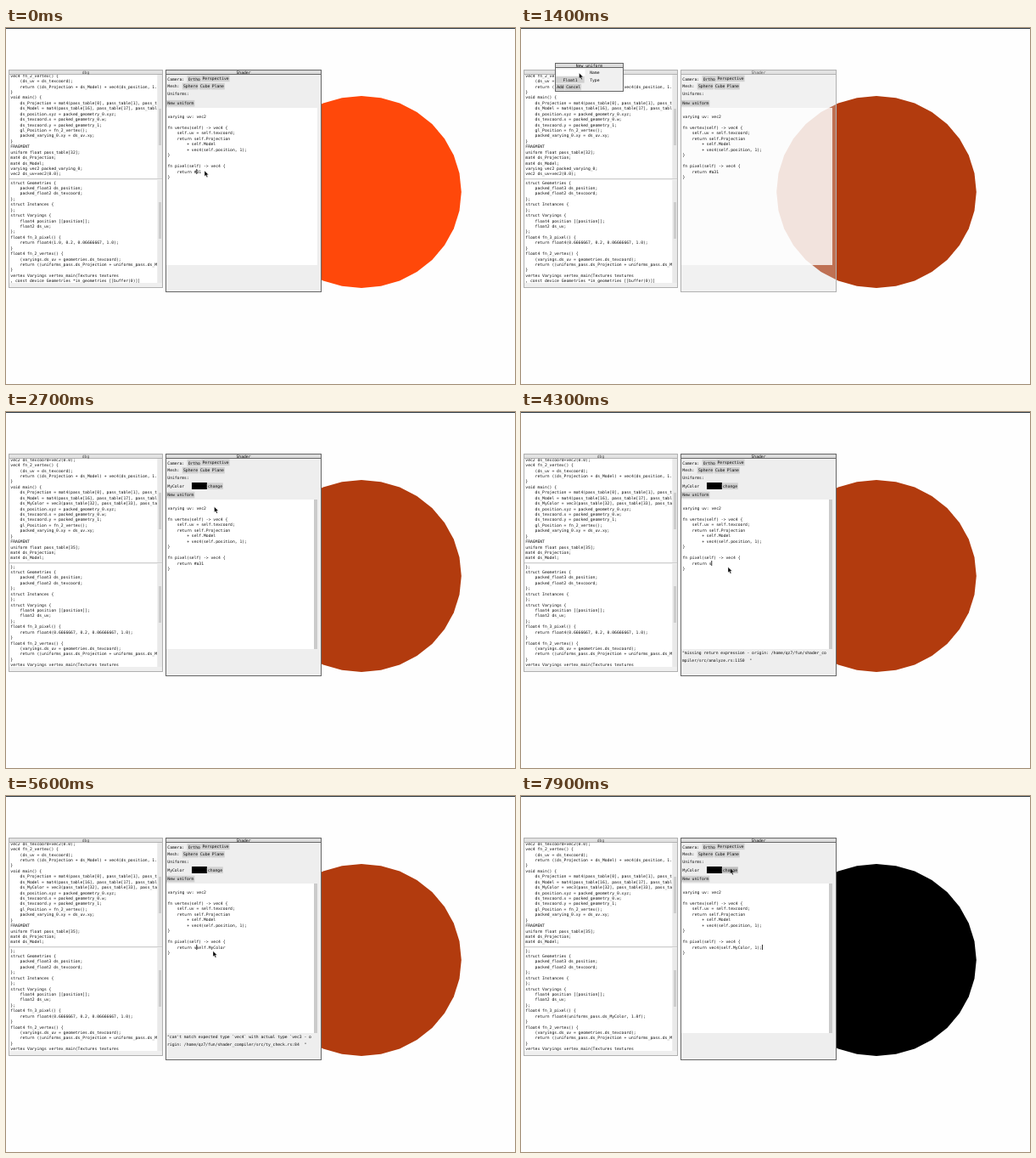
These frames come from a looping animation (600 by 419 pixels, 8000 ms). An HTML page:

```html
<!DOCTYPE html>
<html lang="en">
<head>
<meta charset="utf-8">
<title>Shader editor</title>
<style>
html, body { margin: 0; width: 100%; height: 100%; overflow: hidden; background: #fefefe; }
svg { display: block; width: 100vw; height: 100vh; }
text { font: 4.72px "DejaVu Sans Mono", monospace; fill: #0c0c0c; white-space: pre; text-rendering: geometricPrecision; }
.dim text { fill: #555; }
</style>
</head>
<body>
<svg id="stage" viewBox="0 0 600 419"></svg>
<script>
const stage = document.getElementById("stage");
const LOOP = 8000, TICK = 100, CHAR = 2.842, LINE = 6.43;

// Key moments of the session, in ms
const RECOLOR = 300, OPEN = 700, ADD = 2500, DONE = 7300;

// Faceted outline of the sphere
const SIDES = 32;
const BALL = Array.from({ length: SIDES }, (_, i) => {
  const a = i * 2 * Math.PI / SIDES;
  return (419 + 117.8 * Math.cos(a)).toFixed(1) + "," + (193 + 113 * Math.sin(a)).toFixed(1);
}).join(" ");

const MOUSE = [
  [0, 234, 168], [300, 234, 168], [700, 206, 88], [1000, 206, 88], [1400, 68.5, 53],
  [1800, 68.5, 53], [2000, 58, 60], [2300, 58, 60], [2400, 46, 69], [2500, 46, 69],
  [2700, 245.5, 111.5], [3100, 236, 178], [3600, 244, 182.5], [7400, 244, 182.5], [7800, 246.5, 85]
];

const escapeXml = s => s.replace(/&/g, "&amp;").replace(/</g, "&lt;").replace(/>/g, "&gt;");
const text = (x, y, s) => `<text x="${x}" y="${y + 1.7}">${escapeXml(s)}</text>`;
const centered = (x, y, s) => text(x - s.length * CHAR / 2, y, s);
const lines = (x, y, list, step = LINE) => list.map((s, i) => text(x, y + i * step, s)).join("");
const box = (x, y, w, h, fill, extra = "") =>
  `<rect x="${x}" y="${y}" width="${w}" height="${h}" fill="${fill}" ${extra}/>`;
const button = (x, y, s, hot) =>
  box(x - 1.2, y - 3.8, s.length * CHAR + 2, 7.5, hot ? "#bdbdbd" : "#d0d0d0") + text(x, y, s);
const clipped = (x, y, w, h, body) =>
  `<svg x="${x}" y="${y}" width="${w}" height="${h}" viewBox="${x} ${y} ${w} ${h}">${body}</svg>`;

function frame(x, y, w, h, title, active, fill) {
  const edge = `stroke="${active ? "#666" : "#b0b0b0"}"`;
  return box(x, y, w, h, fill, edge) +
    box(x, y, w, 5, active ? "#dcdcdc" : "#e2e2e2", edge) +
    `<g class="${active ? "" : "dim"}">${centered(x + w / 2, y + 2.5, title)}</g>`;
}

function pointer(t) {
  const i = MOUSE.findIndex(k => k[0] > t);
  if (i < 0) return MOUSE[MOUSE.length - 1].slice(1);
  const [a, b] = [MOUSE[i - 1], MOUSE[i]];
  const p = (t - a[0]) / (b[0] - a[0]), e = p * p * (3 - 2 * p);
  return [1, 2].map(n => a[n] + (b[n] - a[n]) * e);
}

// Returned expression and caret column
function expression(t) {
  if (t < 100) return ["#31", 1];
  if (t < 3200) return ["#a31", 2];
  if (t < 4300) {
    const s = "#a31".slice(0, Math.max(0, 3 - Math.floor((t - 3200) / 100)));
    return [s, s.length];
  }
  const name = "self.MyColor".slice(0, 1 + Math.floor((t - 4300) / 60));
  if (t < 5500) return [name, t < 5200 ? name.length : 0];
  const head = "vec4(".slice(0, 1 + Math.max(0, Math.floor((t - 5700) / 100)));
  const tail = ", 1);".slice(0, [6600, 6800, 7000, 7200, 7300].filter(k => k <= t).length);
  const s = head + name + tail;
  return [s, t < 6500 ? head.length : s.length];
}

function errorText(t) {
  const root = "/home/qz7/fun/shader_compiler/";
  if (t < 3800 || t >= DONE) return "";
  if (t < 5000) return `"missing return expression - origin: ${root}src/analyze.rs:1150  "`;
  if (t < 6100) return `"can't match expected type \`vec4\` with actual type \`vec3 - origin: ${root}src/ty_check.rs:84  "`;
  return `"Could not find ending token ) whilst scanning - origin: ${root}live_compiler/src/live_parser.rs:751  "`;
}

function glsl(added) {
  return [
    ...(added ? ["vec2 ds_texcoord=vec2(0.0);"] : []),
    "vec4 fn_2_vertex() {",
    "    (ds_uv = ds_texcoord);",
    "    return ((ds_Projection + ds_Model) + vec4(ds_position, 1.0));",
    "}",
    "void main() {",
    "    ds_Projection = mat4(pass_table[0], pass_table[1], pass_table[2],",
    "    ds_Model = mat4(pass_table[16], pass_table[17], pass_table[18],",
    ...(added ? ["    ds_MyColor = vec3(pass_table[32], pass_table[33], pass_table[34]);"] : []),
    "    ds_position.xyz = packed_geometry_0.xyz;",
    "    ds_texcoord.x = packed_geometry_0.w;",
    "    ds_texcoord.y = packed_geometry_1;",
    "    gl_Position = fn_2_vertex();",
    "    packed_varying_0.xy = ds_uv.xy;",
    "}",
    "FRAGMENT",
    `uniform float pass_table[${added ? 35 : 32}];`,
    "mat4 ds_Projection;",
    "mat4 ds_Model;",
    "varying vec2 packed_varying_0;",
    "vec2 ds_uv=vec2(0.0);"
  ].slice(0, 19);
}

function metal(t, added) {
  const color = t < 100 ? "1.0, 0.2, 0.06666667, 1.0"
    : t < DONE ? "0.6666667, 0.2, 0.06666667, 1.0" : "uniforms_pass.ds_MyColor, 1.0f";
  return [
    ...(added ? ["};"] : []),
    "struct Geometries {",
    "    packed_float3 ds_position;",
    "    packed_float2 ds_texcoord;",
    "};",
    "struct Instances {",
    "};",
    "struct Varyings {",
    "    float4 position [[position]];",
    "    float2 ds_uv;",
    "};",
    "float4 fn_3_pixel() {",
    `    return float4(${color});`,
    "}",
    "float4 fn_2_vertex() {",
    "    (varyings.ds_uv = geometries.ds_texcoord);",
    "    return ((uniforms_pass.ds_Projection + uniforms_pass.ds_Model)",
    "}",
    "vertex Varyings vertex_main(Textures textures",
    ", const device Geometries *in_geometries [[buffer(0)]]"
  ].slice(0, 19);
}

function debugPanel(t) {
  const added = t >= ADD;
  return frame(3.5, 49.5, 181, 256, "dbg", false, "#efefef") +
    box(4, 55, 174, 122, "#fff") + box(4, 179, 174, 121, "#fff") +
    box(4, 177, 180, 1, "#cfcfcf") +
    box(179, 55, 5, 122, "#e9e9e9") + box(179, 179, 5, 121, "#e9e9e9") +
    box(180, 95, 3, 43, "#cdcdcd") + box(180, 205, 3, 43, "#cdcdcd") +
    clipped(4, 55, 174, 122, lines(5.3, 56, glsl(added))) +
    clipped(4, 179, 174, 121, lines(5.3, 181.8, metal(t, added)));
}

function shaderPanel(t) {
  const added = t >= ADD, active = t < OPEN || added;
  const dy = added ? 9 : 0, [expr, caret] = expression(t);
  const code = [
    "varying uv: vec2", "",
    "fn vertex(self) -> vec4 {",
    "    self.uv = self.texcoord;",
    "    return self.Projection",
    "        + self.Model",
    "        + vec4(self.position, 1);",
    "}", "",
    "fn pixel(self) -> vec4 {",
    "    return " + expr,
    "}"
  ];
  let s = frame(188.5, 49.5, 183, 261, "Shader", active, active ? "#eee" : "rgba(216,216,216,.35)");
  s += text(190.3, 60, "Camera:") + button(214.8, 60, "Ortho") + button(231.5, 59.5, "Perspective");
  s += text(190.3, 68.7, "Mesh:") + button(209, 68.7, "Sphere") + button(229, 68.7, "Cube") + button(242.8, 68.7, "Plane");
  s += text(190.3, 77.5, "Uniforms:");
  if (added) {
    s += text(190.3, 87.2, "MyColor") + box(219, 83, 18, 8, "#000") +
      button(238, 87.2, "change", t >= 7700);
  }
  s += button(190.3, 88.7 + dy, "New uniform", t >= 600 && t < 1100);
  s += box(189, 94 + dy, 178, 185 - dy, active ? "#fff" : "rgba(255,255,255,.8)");
  if (added) s += box(363, 103, 4, 176, "#cbcbcb");
  s += lines(190.5, 104.3 + dy, code, 6.47);
  if (t < OPEN || t >= 3000) s += box(190.3 + (11 + caret) * CHAR, 166 + dy, .8, 6, "#000");
  return s + lines(190, 283.2, errorText(t).match(/.{1,60}/g) || [], 9);
}

function dialog(t) {
  if (t < OPEN || t >= ADD) return "";
  const name = "MyColor".slice(0, Math.max(0, Math.floor((t - 1400) / 60)));
  return frame(40.5, 41.5, 80, 33, "New uniform", true, "#f0f0f0") +
    box(41.5, 48.6, 34, 7.6, "#fff") + text(43, 52.4, name) + text(81.2, 52.4, "Name") +
    box(41.2, 57.2, 33.5, 7.4, "#d0d0d0") +
    centered(58, 61, t < 2200 ? "Float1" : "Color") + text(81.2, 61, "Type") +
    button(42.2, 69.7, "Add") + button(53.2, 69.7, "Cancel");
}

function draw(t) {
  const color = t < RECOLOR ? "#ff480a" : t < DONE ? "#b23b0e" : "#000";
  const [x, y] = pointer(t);
  stage.innerHTML = box(0, 0, 600, 419, "#fefefe") + box(0, 0, 600, 1, "#2b3640") +
    `<polygon points="${BALL}" fill="${color}"/>` +
    debugPanel(t) + shaderPanel(t) + dialog(t) +
    `<path transform="translate(${x} ${y})" d="M0 0v6.6l1.5-1.4 1.2 2.6 1.2-.6-1.2-2.4h2.1z" stroke="#fff" stroke-width=".4"/>`;
}

const start = performance.now();
let last = -1;
function loop(now) {
  const t = Math.floor(Math.max(0, now - start) % LOOP / TICK) * TICK;
  if (t !== last) draw(last = t);
  requestAnimationFrame(loop);
}
draw(0);
requestAnimationFrame(loop);
</script>
</body>
</html>
```
